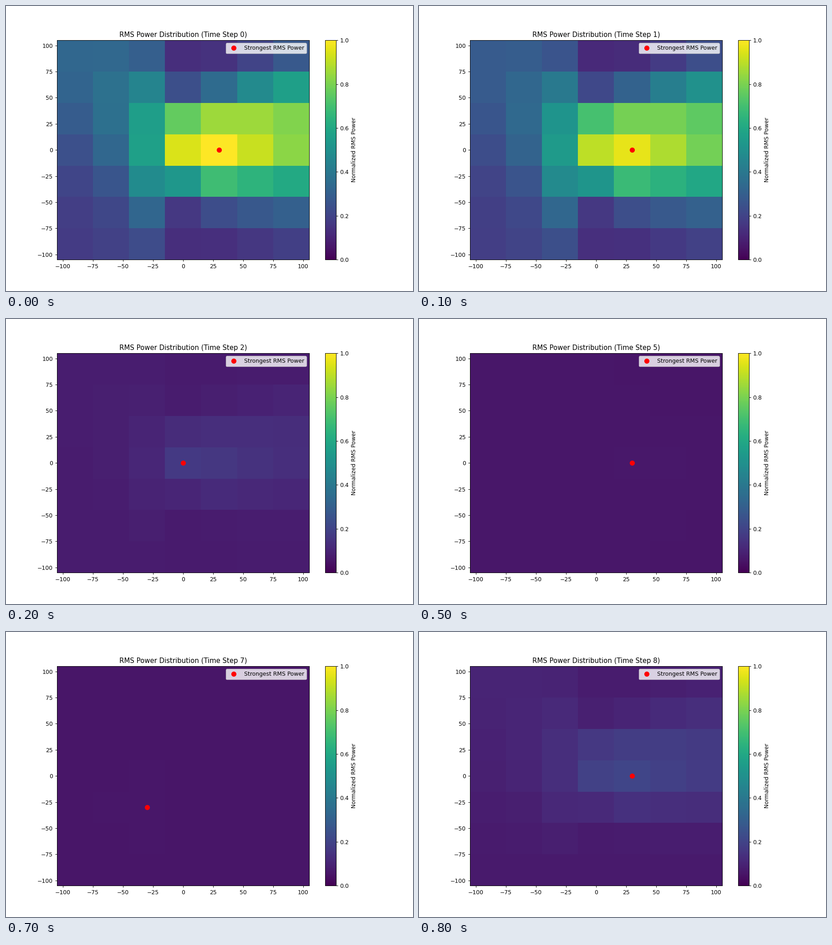
A matplotlib script that plays this animation: 894x626 px, repeating every 900 ms.

```python
import numpy as np
import matplotlib.pyplot as plt
from matplotlib.animation import FuncAnimation

DPI = 89.4
STEPS = 9
AXIS = np.linspace(-90, 90, 7)
X, Y = np.meshgrid(AXIS, AXIS)


def along_x(*values):
    return np.interp(X, [-90, -60, -30, 0, 30, 90], values)


def bump(x, y, width, height):
    return np.exp(-((X - x) / width) ** 2 - ((Y - y) / height) ** 2)


def strong():
    """A flat-topped ridge over y whose shape changes along x."""
    floor = along_x(0.17, 0.19, 0.20, 0.13, 0.13, 0.17)
    height = along_x(0.16, 0.18, 0.37, 0.82, 0.88, 0.67)
    centre = along_x(100, 47, 12, 6, 5, 13)
    width = along_x(110, 80, 70, 41, 48, 60)
    return floor + height * np.exp(-np.abs((Y - centre) / width) ** 2.5)


def tilted():
    return strong() * (0.955 - 0.001 * Y)


def fading():
    return 0.07 + 0.09 * tilted() ** 1.7 + 0.02 * bump(0, 0, 25, 25)


def quiet():
    return 0.062 + 0.004 * bump(-90, 0, 60, 120) + 0.014 * bump(42, 0, 40, 20)


def faint():
    return 0.055 + 0.005 * bump(-35, -30, 60, 60)


def rising():
    return 0.065 + 0.14 * (strong() * np.minimum(1, 1.15 + 0.009 * Y)) ** 1.3


def power(step):
    if 3 <= step <= 7:
        k = (step - 3) / 4
        return (1 - k) * quiet() + k * faint()
    return {0: strong, 1: tilted, 2: fading, 8: rising}[step]()


def peak(z):
    row, col = np.unravel_index(np.argmax(z), z.shape)
    return AXIS[col], AXIS[row]


fig, ax = plt.subplots(figsize=(894.01 / DPI, 626.01 / DPI), dpi=DPI)
mesh = ax.pcolormesh(X, Y, strong(), cmap="viridis", vmin=0, vmax=1,
                     shading="nearest")
fig.colorbar(mesh, ax=ax, label="Normalized RMS Power")
dot, = ax.plot([30], [0], "ro", markersize=8, label="Strongest RMS Power")
ticks = np.arange(-100, 101, 25)
ax.set(xticks=ticks, yticks=ticks, xlim=(-105, 105), ylim=(-105, 105))
ax.legend(loc="upper right")
title = ax.set_title("")


def update(step):
    z = power(step)
    x, y = peak(z)
    mesh.set_array(z)
    dot.set_data([x], [y])
    title.set_text(f"RMS Power Distribution (Time Step {step})")
    return mesh, dot, title


anim = FuncAnimation(fig, update, frames=STEPS, interval=100,
                     repeat=True, repeat_delay=0, blit=False)
plt.show()
```
